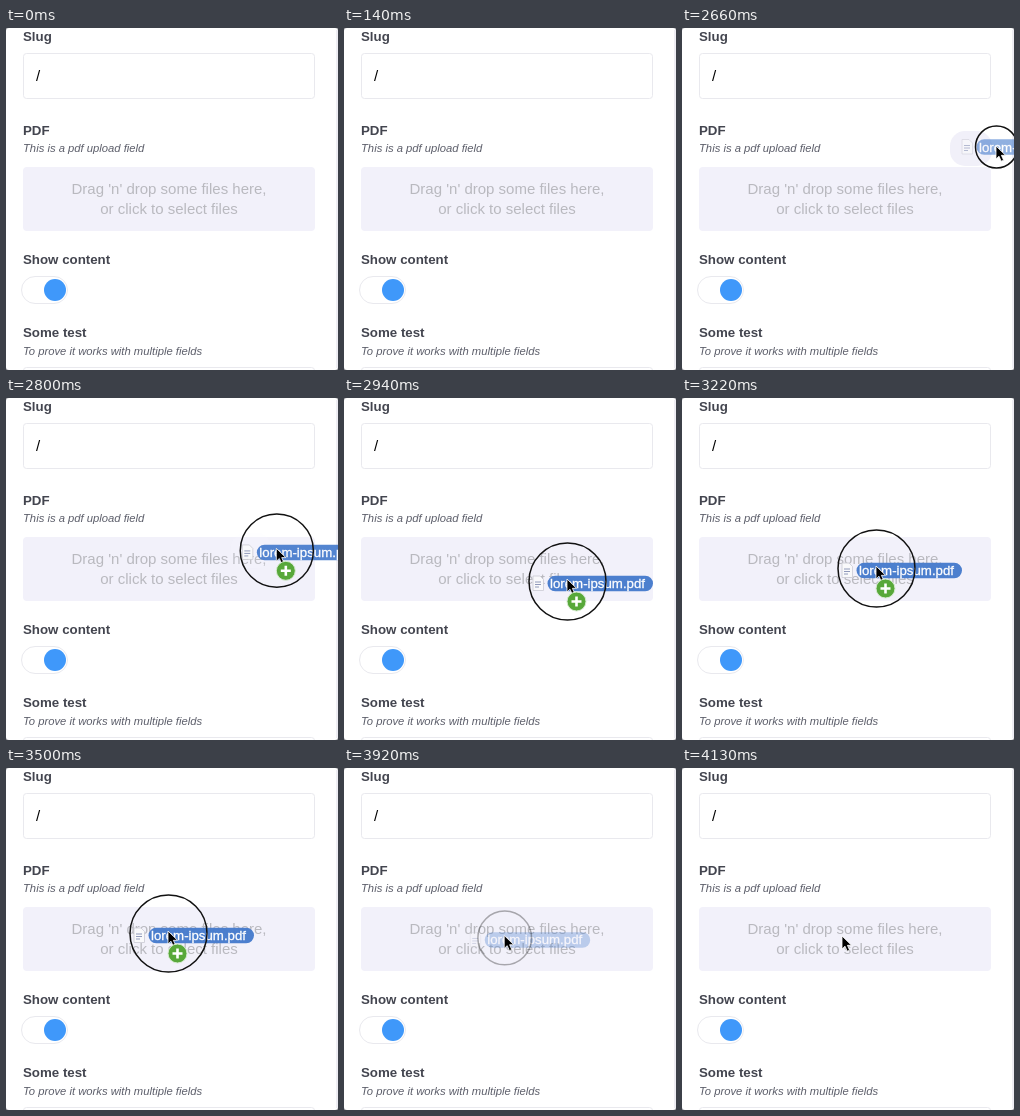
An HTML page that plays this animation: 332 by 342 pixels, repeating every 8000 ms.

```html
<!DOCTYPE html>
<html lang="en">
<head>
<meta charset="utf-8">
<title>PDF upload field</title>
<style>
  html, body { margin: 0; width: 100%; height: 100%; overflow: hidden; background: #8a8a90; }
  svg { display: block; width: 332px; height: 342px; font-family: "Liberation Sans", Arial, sans-serif; }
  .label { font-size: 13.3px; font-weight: bold; fill: #43454f; }
  .hint { font-size: 11.25px; font-style: italic; fill: #5c5e6a; }
  .drop { font-size: 15px; fill: #b9b9bf; text-anchor: middle; }
  .box { fill: #fff; stroke: #e9e9ee; }
</style>
</head>
<body>
<svg viewBox="0 0 332 342">
  <rect width="332" height="342" rx="3" fill="#fff"/>
  <rect x="330" y="2" width="2" height="338" fill="#eeedf3"/>

  <text class="label" x="17" y="13">Slug</text>
  <rect class="box" x="17.5" y="25.5" width="291" height="45" rx="3"/>
  <text x="30" y="52.5" font-size="15">/</text>

  <text class="label" x="17" y="107">PDF</text>
  <text class="hint" x="17" y="124">This is a pdf upload field</text>
  <rect x="17" y="139" width="292" height="64" rx="4" fill="#f2f1fa"/>
  <text class="drop" x="163" y="166">Drag 'n' drop some files here,</text>
  <text class="drop" x="163" y="186">or click to select files</text>

  <text class="label" x="17" y="236">Show content</text>
  <rect class="box" x="15.5" y="248.5" width="46" height="27" rx="13.5"/>
  <circle cx="49" cy="262" r="11" fill="#3f98fa"/>

  <text class="label" x="17" y="309">Some test</text>
  <text class="hint" x="17" y="327">To prove it works with multiple fields</text>
  <rect class="box" x="17.5" y="339.5" width="291" height="45" rx="3"/>

  <g id="pointer">
    <rect id="ghost" x="-46" y="-15" width="42" height="35" rx="15" fill="#f1f0f9"/>
    <g id="file">
      <path d="M-34-7.500h7l3.500 3.500v11h-10.500z" fill="#fafafc" stroke="#c9c9d2" stroke-width=".8"/>
      <path d="M-32-1.500h6M-32 1h6M-32 3.500h4" stroke="#8d97b8"/>
      <rect x="-19.500" y="-7.750" width="105.500" height="15.500" rx="7.750" fill="#477ccd"/>
      <text x="-17" y="4.500" font-size="13.250" fill="#fff" stroke="#fff" stroke-width=".3">lorem-ipsum.pdf</text>
    </g>
    <circle id="ring" cx=".5" fill="none" stroke="#111" stroke-width="1.500"/>
    <path d="M0 0v13l3-2.800 2.200 5 2.400-1-2.200-4.900h4.100z" fill="#000" stroke="#fff" stroke-width=".8"/>
    <g id="badge" transform="translate(9.500 22.500)">
      <circle r="9.500" fill="#58a83a" stroke="#d6ead0"/>
      <path d="M-5 0H5M0-5V5" stroke="#fff" stroke-width="2.600"/>
    </g>
  </g>
</svg>
<script>
const LOOP = 8000, STEP = 70, START = 2660, SEG = 280, RELEASE = 3780, END = 4130;
const path = [[314, 118], [223, 181], [194, 168], [162, 163], [160, 168]];
const [pointer, ghost, file, ring, badge] =
  ["pointer", "ghost", "file", "ring", "badge"].map(id => document.getElementById(id));

const ramp = (t, from, to) => Math.min(1, Math.max(0, (t - from) / (to - from)));
const easeOut = p => 1 - (1 - p) ** 2;
const show = (el, opacity) => el.setAttribute("opacity", opacity);

// Catmull-Rom between four neighbouring values
const spline = (a, b, c, d, p) =>
  b + p * ((c - a) / 2 + p * (a - 2.5 * b + 2 * c - d / 2 + p * (1.5 * (b - c) + (d - a) / 2)));

function position(t) {
  const s = Math.max(0, (t - START) / SEG), i = Math.floor(s);
  if (i >= 3) {
    const p = easeOut(ramp(t, START + 3 * SEG, END));
    return path[3].map((v, k) => v + (path[4][k] - v) * p);
  }
  return [0, 1].map(k =>
    spline(path[Math.max(0, i - 1)][k], path[i][k], path[i + 1][k], path[i + 2][k], s - i));
}

function draw(t) {
  const [x, y] = position(t);
  const grow = easeOut(ramp(t, START, START + 210));
  const drop = ramp(t, RELEASE, RELEASE + 210);
  pointer.setAttribute("transform", `translate(${x} ${y})`);
  pointer.style.display = t < START ? "none" : "";
  file.setAttribute("transform", `translate(0 ${1 + 3.5 * grow})`);
  show(file, (0.6 + 0.37 * grow) * (1 - drop));
  show(ghost, 1 - grow);
  ring.setAttribute("r", 21 + 17.5 * grow * (1 - drop));
  ring.setAttribute("cy", 1 + 1.5 * grow);
  show(ring, 1 - drop);
  show(badge, y > 139 && t < RELEASE ? 1 : 0);
}

const begin = performance.now();
function tick() {
  const t = (performance.now() - begin) % LOOP;
  draw(Math.floor(t / STEP) * STEP);
  requestAnimationFrame(tick);
}
tick();
</script>
</body>
</html>
```
